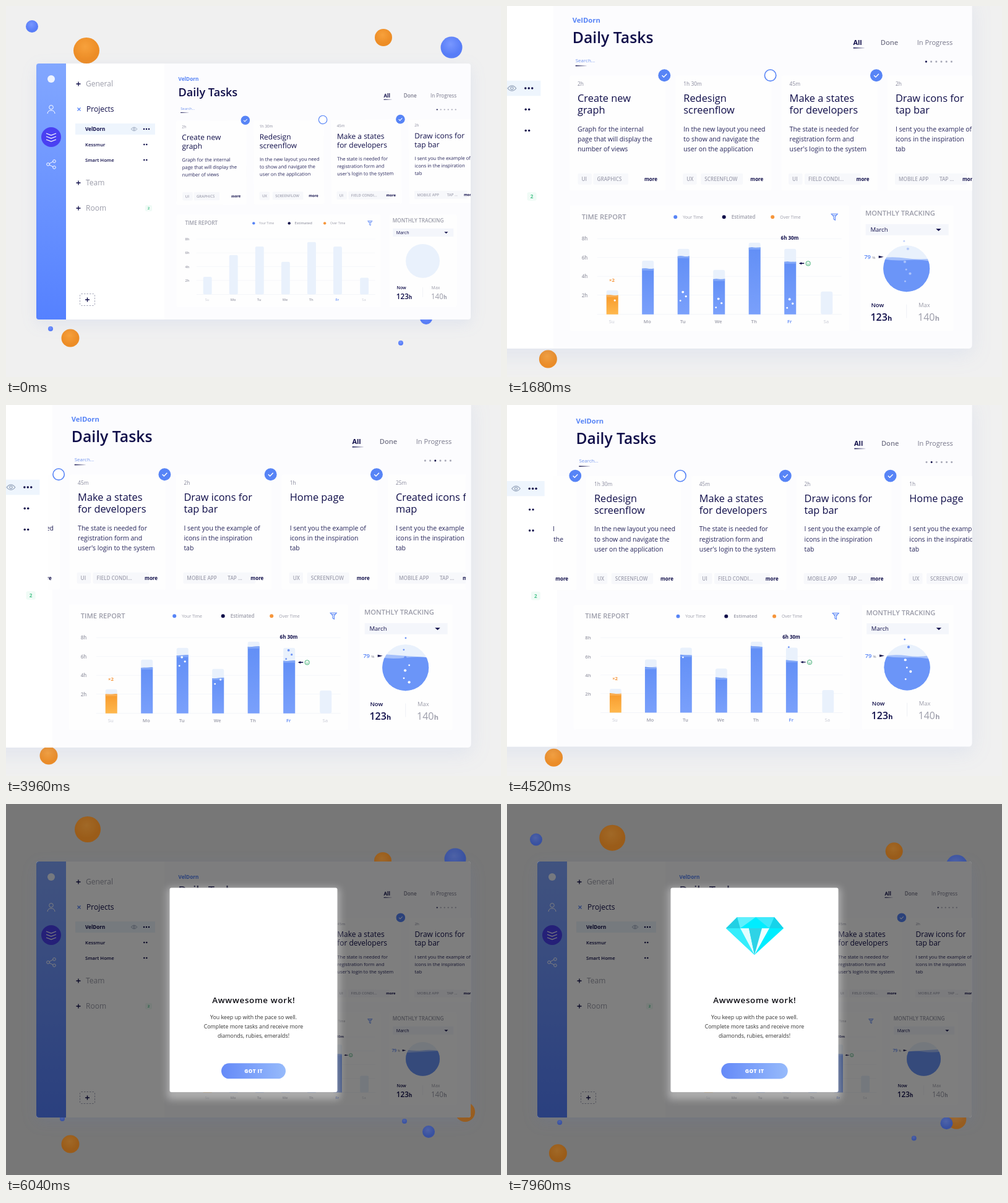
Write an HTML page that moves like this. It is 800x600 px and loops after 8 s.

```html
<!DOCTYPE html>
<html lang="en">
<head>
<meta charset="utf-8">
<title>Daily Tasks</title>
<style>
html, body { margin: 0; width: 100%; height: 100%; overflow: hidden; background: #f0f0f0; }
svg { display: block; width: 800px; height: 600px; font-family: "Open Sans", sans-serif; }
text { white-space: pre; }
#bubbles circle { filter: blur(.6px); }
#shadow { filter: drop-shadow(0 7px 12px rgba(90,130,230,.1)); }
#glow { filter: blur(6px); }
</style>
</head>
<body>
<svg id="stage" viewBox="0 0 800 600">
  <defs>
    <linearGradient id="side" x2="0" y2="1"><stop stop-color="#82a7ff"/><stop offset="1" stop-color="#5581ff"/></linearGradient>
    <linearGradient id="blue" x2="0" y2="1"><stop stop-color="#628ff6"/><stop offset="1" stop-color="#7aa0fb"/></linearGradient>
    <linearGradient id="gold" x2="0" y2="1"><stop stop-color="#f79a2c"/><stop offset="1" stop-color="#ffb84d"/></linearGradient>
    <linearGradient id="button"><stop stop-color="#658af8"/><stop offset="1" stop-color="#96bafb"/></linearGradient>
    <linearGradient id="fade"><stop stop-color="#14134f"/><stop offset="1" stop-color="#14134f" stop-opacity=".1"/></linearGradient>
    <radialGradient id="ballO" cx=".45" cy=".35"><stop stop-color="#f7a13c"/><stop offset="1" stop-color="#ed8d26"/></radialGradient>
    <radialGradient id="ballB" cx=".45" cy=".35"><stop stop-color="#7897ff"/><stop offset="1" stop-color="#587df7"/></radialGradient>
    <clipPath id="window"><rect x="67" y="95" width="684" height="210"/></clipPath>
    <clipPath id="trackEnd"><rect x="40" y="80" width="1043" height="240"/></clipPath>
    <clipPath id="pieClip"><circle cx="645" cy="424" r="37.5"/></clipPath>
  </defs>
  <rect width="800" height="600" fill="#f0f0f0"/>
  <rect id="dimBack" width="800" height="600"/>
  <g id="bubbles"></g>
  <g id="camera">
    <rect id="shadow" x="49" y="93" width="702" height="414" rx="4" fill="#fcfcfe"/>
    <g id="nav"></g>
    <g id="content" transform="translate(201.7 102.2) scale(.7315)">
      <g id="boxes"></g>
      <g clip-path="url(#window)"><g id="track" clip-path="url(#trackEnd)"></g></g>
      <g id="head"></g>
      <g id="chart"></g>
      <g id="pie"></g>
    </g>
    <rect id="dimPanel" x="49" y="93" width="702" height="414" rx="4"/>
  </g>
  <g id="modal"></g>
</svg>
<script>
const NAVY = '#0f0d49', GRAY = '#9b9ca9', BLUE = '#5784f6', ORANGE = '#f6953a', PALE = '#e9f1fc';
const LOOP = 8000, PITCH = 171.3, BASE = 498;
const $ = id => document.getElementById(id);

function add(parent, tag, attrs, text) {
  const el = document.createElementNS('http://www.w3.org/2000/svg', tag);
  set(el, attrs);
  if (text !== undefined) el.textContent = text;
  return parent.appendChild(el);
}
function set(el, attrs) {
  for (const key in attrs) el.setAttribute(key, attrs[key]);
}
const label = (p, x, y, text, size, fill = NAVY, weight = 400, more = {}) =>
  add(p, 'text', { x, y, fill, 'font-size': size, 'font-weight': weight, ...more }, text);
const box = (p, x, y, width, height, fill, rx = 0, more = {}) =>
  add(p, 'rect', { x, y, width, height, fill, rx, ...more });
const dot = (p, cx, cy, r, fill, more = {}) => add(p, 'circle', { cx, cy, r, fill, ...more });
const line = (p, d, stroke, width = 1, more = {}) =>
  add(p, 'path', { d, stroke, fill: 'none', 'stroke-width': width, ...more });
const shape = (p, d, fill) => add(p, 'path', { d, fill });
const mid = { 'text-anchor': 'middle' };

const ease = (t, from, to) => {
  const u = Math.min(1, Math.max(0, (t - from) / (to - from)));
  return u * u * (3 - 2 * u);
};

// Sidebar and project list
const nav = $('nav');
shape(nav, 'M97 93H256V507H97Z', '#fff');
shape(nav, 'M97 93H53Q49 93 49 97V503Q49 507 53 507H97Z', 'url(#side)');
dot(nav, 73, 118, 6, '#eef3ff');
dot(nav, 73, 163.8, 3.3, 'none', { stroke: '#fff' });
line(nav, 'M67 174Q67.500 168.800 73 168.800T79 174', '#fff');
dot(nav, 73, 212, 16, '#4a40f2');
for (const y of [206, 211, 216]) line(nav, `M65 ${y}L73 ${y + 3}L81 ${y}`, '#fff', 1.2);
line(nav, 'M70 255L76 251.500M70 257L76 260', '#fff');
for (const [x, y] of [[68, 256], [78, 251], [78, 261]]) dot(nav, x, y, 2.3, 'none', { stroke: '#fff' });

for (const [name, y] of [['General', 126], ['Team', 286], ['Room', 327]]) {
  line(nav, `M113.500 ${y}h7m-3.500 -3.500v7`, NAVY, 1.3);
  label(nav, 129, y + 4, name, 12, GRAY);
}
line(nav, 'M115.500 164.500l5 5m0 -5l-5 5', BLUE, 1.2);
label(nav, 130, 171, 'Projects', 12);
box(nav, 112, 190, 129, 18, '#eef5fd');
[['VelDorn', 199, 3], ['Kessmur', 224, 2], ['Smart Home', 249, 2]].forEach(([name, y, dots], i) => {
  label(nav, 128, y + 3, name, i ? 7.7 : 8.1, NAVY, i ? 600 : 700);
  for (let k = 0; k < dots; k++) dot(nav, (dots > 2 ? 223 : 223.3) + k * 4, y, 1.25, NAVY);
});
line(nav, 'M202 199Q207 193 212 199Q207 205 202 199Z', '#9aa8be', .9);
dot(nav, 207, 199, 1.6, 'none', { stroke: '#9aa8be', 'stroke-width': .9 });
box(nav, 225, 322, 11, 10, '#f0fbf6', 2);
label(nav, 230.5, 329.3, '2', 6, '#4cc48d', 700, mid);
box(nav, 119.500, 465.500, 24, 19, 'none', 2, { stroke: '#8d90a8', 'stroke-width': .8, 'stroke-dasharray': '2.500 2' });
line(nav, 'M128 475h7m-3.500 -3.500v7', NAVY, 1.4);

// Panel backgrounds
const boxes = $('boxes');
box(boxes, 101, 322, 451, 203, '#fefefe', 3);
box(boxes, 571, 322, 150, 203, '#fefefe', 3);

// Task cards
const track = $('track');
const iconBody = ['I sent you the example of', 'icons in the inspiration', 'tab'];
const screenTags = ['UX', 5, 'SCREENFLOW', 34];
const appTags = ['MOBILE APP', 5, 'TAP ...', 71];
const cards = [
  ['2h', ['Create new', 'graph'], ['Graph for the internal', 'page that will display the', 'number of views'], ['UI', 6.5, 'GRAPHICS', 31.5]],
  ['1h 30m', ['Redesign', 'screenflow'], ['In the new layout you need', 'to show and navigate the', 'user on the application'], screenTags],
  ['45m', ['Make a states', 'for developers'], ['The state is needed for', 'registration form and', "user's login to the system"], ['UI', 4.5, 'FIELD CONDI...', 30.5]],
  ['2h', ['Draw icons for', 'tap bar'], iconBody, appTags],
  ['1h', ['Home page'], iconBody, screenTags],
  ['25m', ['Created icons for', 'map'], iconBody, appTags]
];
let ring, ringCheck;
cards.forEach(([time, title, body, tags], i) => {
  const card = add(track, 'g', { transform: `translate(${113.3 + i * PITCH} 0)` });
  box(card, -13, 112, 155, 186, '#fefefe', 3);
  label(card, 0, 128, time, 8.4, '#85869a');
  title.forEach((s, k) => label(card, 0, 154.3 + k * 19.5, s, 16.4));
  body.forEach((s, k) => label(card, 0, 202 + k * 16.4, s, 10.5, '#25245a'));
  for (let k = 0; k < 4; k += 2) {
    box(card, tags[k + 1] - 6, 270, tags[k].length * 5.7 + 11, 18, '#f7f8fb', 2);
    label(card, tags[k + 1], 282, tags[k], 8.2, '#a0a1b0', 600);
  }
  label(card, 108, 282, 'more', 8, NAVY, 700);
  const disc = dot(card, 140.3, 111.5, 9.2, i === 1 ? '#fff' : BLUE, { stroke: BLUE, 'stroke-width': 1.6 });
  const check = line(card, 'M136.500 111.500l2.800 2.800l5 -5.200', '#fff', 1.4);
  if (i === 1) [ring, ringCheck] = [disc, check];
});

// Header
const head = $('head');
label(head, 105, 26.3, 'VelDorn', 11.3, BLUE, 700);
label(head, 105, 59.3, 'Daily Tasks', 24.8, NAVY, 600);
label(head, 110, 90, 'Search...', 8, '#6e92ee');
box(head, 110, 95.2, 18, 1.5, 'url(#fade)');
label(head, 558.7, 62, 'All', 11, NAVY, 700);
box(head, 559, 66.3, 18, 1.6, 'url(#fade)');
label(head, 603, 62, 'Done', 11.2, '#77778a', 600);
label(head, 662, 62, 'In Progress', 11.1, '#77778a');
const pages = cards.map((_, i) => dot(head, 676.7 + i * 8.2, 89.3, 1.5, GRAY));

// Time report
const chart = $('chart');
label(chart, 120, 344.2, 'TIME REPORT', 11.2, GRAY, 600);
[[271.5, BLUE, 'Your Time', 7, 400], [350, NAVY, 'Estimated', 8, 600], [428.5, ORANGE, 'Over Time', 7, 400]]
  .forEach(([x, color, s, size, weight]) => {
    dot(chart, x, 340.6, 3, color);
    label(chart, x + 12, 343.4, s, size, GRAY, weight);
  });
line(chart, 'M523.500 335.500h10l-3.800 4.500v5.500l-2.400 -1.500v-4ZM525 338h7', BLUE, 1.1);
[8, 6, 4, 2].forEach((h, k) => {
  const y = 375.7 + k * 30.4;
  label(chart, 120, y + 3, h + 'h', 8, GRAY, 600);
  line(chart, `M145 ${y}H540`, '#f5f7fb', 1);
});
line(chart, `M145 ${BASE}H540`, '#f2f4f9', 1);
// day, centre, estimate top, filled top, fill start, fill duration, bubbles, bubble speed
const days = [
  ['Su', 169.5, 459, 467, 100, 400, 2, .02],
  ['Mo', 227, 411, 424, 232, 800, 0, 0],
  ['Tu', 284.5, 392, 404, 384, 800, 3, .024],
  ['We', 342, 426, 441, 228, 800, 3, .016],
  ['Th', 399.5, 382, 390, 388, 800, 0, 0],
  ['Fr', 457, 392, 413, 492, 800, 3, .034],
  ['Sa', 516, 461, BASE, 0, 1, 0, 0]
];
const bars = days.map(([day, x, est, top, start, span, count, speed], i) => {
  const faint = i % 6 === 0;
  box(chart, x - 9.5, est, 19, BASE - est, PALE, 3);
  const color = i ? 'url(#blue)' : 'url(#gold)';
  const fill = shape(chart, '', color);
  const cap = shape(chart, '', i ? '#8fb0fa' : '#fbb867');
  const dots = Array.from({ length: count }, (_, k) => dot(chart, 0, 0, 1.7, '#fff'));
  label(chart, x - 1, 512.4, day, 7.8, i === 5 ? BLUE : faint ? '#c8cad4' : GRAY, faint ? 400 : 600, mid);
  return { x, top, start, span, speed, fill, cap, dots };
});
const over = add(chart, 'g', {});
label(over, 168.7, 445.4, '×2', 7.8, ORANGE, 700, mid);
const today = add(chart, 'g', {});
label(today, 456.3, 377.2, '6h 30m', 8, NAVY, 700, mid);
shape(today, 'M471 415.500l4.500 -2v1.300h4v1.400h-4v1.300Z', NAVY);
dot(today, 486, 415.7, 3.7, 'none', { stroke: '#3fae73' });
line(today, 'M484 416.200q2 2.500 4 0M484.700 414.400v.6M487.300 414.400v.6', '#3fae73', .8);

// Monthly tracking
const pie = $('pie');
label(pie, 578.2, 338.8, 'MONTHLY TRACKING', 11.2, GRAY, 600);
box(pie, 579, 352, 134, 18, '#f4f6fb');
label(pie, 586.7, 364.4, 'March', 9.6);
shape(pie, 'M692.500 359.500h8.500l-4.200 3.700Z', NAVY);
dot(pie, 645, 424, 37.5, PALE);
const liquid = add(pie, 'g', { 'clip-path': 'url(#pieClip)' });
const waveBack = shape(liquid, '', '#a5c0fb'), waveFront = shape(liquid, '', '#6b95f8');
const fizz = Array.from({ length: 8 }, (_, k) => dot(pie, 0, 0, k % 2 ? 2.1 : 1.4, '#fff'));
const percent = add(pie, 'g', {});
label(percent, 576.5, 408.3, '79', 9.5, BLUE, 600);
label(percent, 589.5, 408.3, '%', 6, GRAY, 600);
shape(percent, 'M608 405l-8 -2v4Z', NAVY);
label(pie, 587.7, 486.5, 'Now', 9.5, NAVY, 600);
label(pie, 664.3, 486.5, 'Max', 9.5, GRAY);
line(pie, 'M645 482V504', '#eef0f5');
[[586.7, '123', NAVY, 600], [663.3, '140', GRAY, 400]].forEach(([x, s, color, weight]) => {
  label(pie, x, 508.5, s, 16, color, weight);
  label(pie, x + 27.7, 508.5, 'h', 11, color, 700);
});

// Floating balls: colour, radius, then time / x / y steps
const balls = [
  ['O', 21, [0, 130, 72], [5320, 129, 12], [6040, 132, 41], [8000, 171, 55]],
  ['B', 10, [0, 42, 33], [4500, 44, 25], [5320, 47, 3], [6040, 47, -14], [8000, 47, 59]],
  ['O', 14, [0, 610, 51], [5320, 589, 87], [6040, 609, 92], [8000, 626, 76]],
  ['B', 17.5, [0, 720, 67], [5320, 728, 80], [6040, 726, 89], [8000, 727, 100]],
  ['O', 16, [0, 725, 480], [4500, 732, 475], [5320, 745, 486], [6040, 742, 498], [8000, 726, 510]],
  ['B', 10, [0, 679, 505], [5320, 683, 526], [6040, 683, 530], [8000, 711, 516]],
  ['B', 4, [0, 638, 545], [5320, 626, 516], [6040, 644, 513], [8000, 658, 541]],
  ['B', 4, [0, 72, 522], [5320, 95, 503], [6040, 91, 509], [8000, 85, 515]],
  ['O', 14.5, [0, 104, 537], [680, 93, 552], [1250, 75, 583], [1900, 62, 565], [2520, 78, 537],
    [3500, 62, 577], [3960, 69, 567], [4400, 74, 573], [5320, 86, 553], [6040, 104, 550], [8000, 82, 565]]
].map(([color, r, ...steps]) => ({ steps, el: dot($('bubbles'), 0, 0, r, `url(#ball${color})`) }));

function along(steps, t) {
  const i = Math.max(1, steps.findIndex(s => s[0] > t));
  const [t0, x0, y0] = steps[i - 1], [t1, x1, y1] = steps[i];
  const u = (t - t0) / (t1 - t0);
  return { cx: x0 + (x1 - x0) * u, cy: y0 + (y1 - y0) * u };
}

// Reward dialog
const modal = $('modal');
box(modal, 260, 135, 280, 343, '#fff', 6, { id: 'glow', opacity: .36 });
box(modal, 264.500, 135.500, 271, 330.500, '#fff', 3);
label(modal, 400.3, 321.5, 'Awwwesome work!', 13.4, '#0c0c12', 600, { ...mid, 'letter-spacing': .65 });
['You keep up with the pace so well.', 'Complete more tasks and receive more', 'diamonds, rubies, emeralds!']
  .forEach((s, k) => label(modal, 400, 348 + k * 15, s, 8.8, '#333', 400, mid));
const button = add(modal, 'g', {});
box(button, -52, -12.500, 104, 25, 'url(#button)', 12.5);
label(button, .2, 3.1, 'GOT IT', 8.3, '#fff', 800, { ...mid, 'letter-spacing': .4 });
const gem = add(modal, 'g', {});
shape(gem, 'M-28 -30H32L47 -12L0 31L-46 -12Z', '#00edff');
shape(gem, 'M-28 -30L-46 -12H-23Z', '#22d0e4');
shape(gem, 'M-28 -30H2L-23 -12Z', '#5ff0fd');
shape(gem, 'M2 -30H32L24 -12Z', '#3fe9fb');
shape(gem, 'M32 -30L47 -12H24Z', '#16d3ea');
shape(gem, 'M-46 -12H-23L0 31Z', '#35eefc');
shape(gem, 'M-23 -12H-9L0 31Z', '#e2feff');
shape(gem, 'M-9 -12H12L0 31Z', '#2fd3e6');
shape(gem, 'M12 -12H24L0 31Z', '#effeff');

const wave = (x0, x1, level, bottom, size, phase) => {
  const w = (x1 - x0) / 4;
  const a = size * Math.sin(phase), b = size * Math.cos(phase);
  return `M${x0} ${bottom}V${level + a}Q${x0 + w} ${level - b} ${x0 + 2 * w} ${level}T${x1} ${level - a}V${bottom}Z`;
};

function draw(t) {
  const zoom = ease(t, 20, 600) * (1 - ease(t, 4450, 5100));
  set($('camera'), { transform: `translate(${-275 * zoom} ${-139 * zoom}) scale(${1 + .367 * zoom})` });

  const page = (ease(t, 2100, 2690) + ease(t, 3400, 4000)) * (1 - ease(t, 4250, 4750));
  const tilt = -.5 * (1 - ease(t, -120, 240));
  set(track, { transform: `translate(${-page * PITCH} 0) rotate(${tilt} 470 200)` });
  pages.forEach((el, i) => set(el, { fill: i === Math.round(page) ? NAVY : '#a5a6b5' }));
  set(ring, { fill: t > 5180 ? '#7394f2' : '#fff' });
  set(ringCheck, { opacity: ease(t, 5360, 5500) });

  for (const { x, top, start, span, speed, fill, cap, dots } of bars) {
    const height = (BASE - top) * ease(t, start, start + span);
    const level = BASE - height;
    const visible = height > .5 ? 1 : 0;
    set(fill, { d: wave(x - 9.5, x + 9.5, level, BASE, .8, t / 260), opacity: visible });
    set(cap, { d: wave(x - 9.5, x + 9.5, level, Math.min(BASE, level + 3), 1, t / 330 + x), opacity: visible * .7 });
    const friday = top === 413;
    const begin = top === 467 ? 350 : friday ? 1050 : 300;
    dots.forEach((el, k) => {
      const cy = BASE - 3 - speed * (t - begin) + k * 7;
      const above = cy < level + 2;
      const shown = cy < BASE - 3 && (!above || friday && cy > 384);
      set(el, { cx: x + [-1, 4, -5][k], cy, r: 1.9 - k * .25, fill: above ? '#6b92f5' : '#fff', opacity: shown ? 1 : 0 });
    });
  }
  set(over, { opacity: ease(t, 800, 1100) });
  set(today, { opacity: ease(t, 1300, 1600) });

  const rise = ease(t, 800, 1800);
  const level = 464 - 57 * rise;
  set(waveBack, { d: wave(606, 684, level - 2, 464, 3, t / 420 + 2) });
  set(waveFront, { d: wave(606, 684, level + 1, 464, 2.5, t / 420) });
  fizz.forEach((el, k) => {
    const cy = 455 - (t * .03 + k * 10.5 + (k % 3) * 2) % 84;
    const on = ease(t, 1500, 1900) * (1 - ease(t, 4800, 5250));
    const sparse = cy < level && k % 3 === 0 ? 0 : 1;
    set(el, { cx: 646 + 5 * Math.sin(k * 2.4 + cy / 30), cy, fill: cy < level + 2 ? '#6b92f5' : '#fff', opacity: on * sparse });
  });
  set(percent, { opacity: ease(t, 1400, 1700) });

  for (const { steps, el } of balls) set(el, along(steps, t));

  const dim = ease(t, 5200, 5700);
  set($('dimBack'), { opacity: dim * .5 });
  set($('dimPanel'), { opacity: dim * .5 });
  $('bubbles').style.filter = dim ? `brightness(${1 - .35 * dim})` : 'none';

  const open = ease(t, 5400, 5750);
  set(modal, { opacity: open, transform: `translate(0 ${14 * (1 - open)})` });
  const pulse = 1 + .017 * (1 - Math.cos((t - 6040) * Math.PI / 640));
  set(button, { transform: `translate(400 431.800) scale(${pulse} ${1 + (pulse - 1) * .6})` });
  const pop = ease(t, 6200, 6600);
  const size = pop + .12 * Math.sin(pop * Math.PI);
  set(gem, { transform: `translate(400 213) scale(${size})`, opacity: pop > 0 ? 1 : 0 });
}

const begun = performance.now();
function tick() {
  draw((performance.now() - begun) % LOOP);
  requestAnimationFrame(tick);
}
draw(0);
requestAnimationFrame(tick);
</script>
</body>
</html>
```
